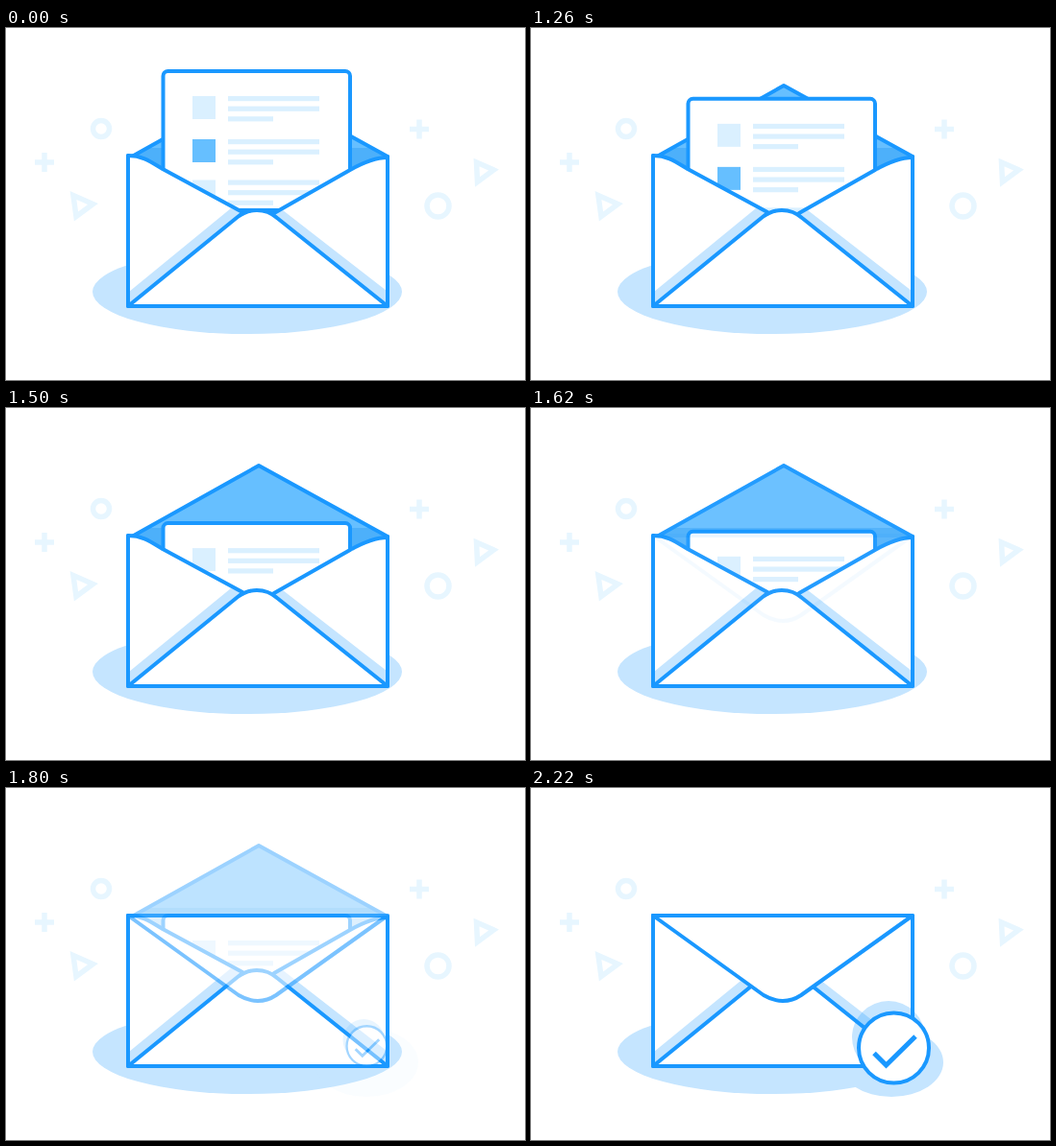
An HTML page for the animation above (3060 ms loop, 540 px wide and 367 px high).

```html
<!DOCTYPE html>
<html lang="en">
<head>
<meta charset="utf-8">
<title>Envelope</title>
<style>
  html, body { margin: 0; width: 100%; height: 100%; overflow: hidden; background: #fff; }
  svg { display: block; width: 100%; height: 100%; }
  .line { stroke: #1a98ff; stroke-width: 4; stroke-linejoin: round; stroke-linecap: round; }
  .shade { fill: #c5e5ff; }
  .deco { fill: none; stroke: #e7f6ff; stroke-width: 5.5; }
</style>
</head>
<body>
<svg viewBox="0 0 540 367" fill="none">
  <g class="deco">
    <path d="M30 140H50M40 130V150M420 105.500H440M430 95.500V115.500"/>
    <circle cx="99" cy="105" r="8.500"/>
    <circle cx="449.500" cy="185.500" r="11.500"/>
    <path d="M70 174.500L90.500 183.500L73 196.500ZM489.500 140L507.500 148L490.500 160.500Z"/>
  </g>

  <ellipse class="shade" cx="251" cy="275" rx="161" ry="44"/>
  <ellipse id="badgeShade" class="shade" cx="375" cy="286" rx="54" ry="36"/>
  <path d="M127 133H397V290H127Z" fill="#fff"/>

  <g id="back">
    <path d="M131 134L263 60L397 134L370 165H150Z" fill="#66bfff"/>
    <path d="M131 134L149 125H377L397 134L370 165H150Z" fill="#4db0fa"/>
    <path class="line" d="M131 134L263 60L397 134"/>
  </g>

  <g id="paper">
    <rect class="line" x="163.500" y="0" width="194.500" height="145" rx="5" fill="#fff"/>
  </g>

  <path d="M127 133C142 133 150 139 163 147L246 192L262 196L279 194L358 149C372 141 384 134 397 134V290H127Z" fill="#fff"/>
  <path class="shade" d="M128 290V275L234 188L246 192ZM396 290V274L288 190L279 194Z"/>
  <path class="line" d="M127 133C142 133 150 139 163 147L246 192M397 135C384 135 372 140 358 148L279 193"/>
  <path class="line" d="M127 290L241 197Q250 190 261 190Q273 190 282 198L397 290Z" fill="#fff"/>
  <path class="line" d="M127 133V290H397V134"/>

  <g id="flap">
    <path class="line" d="M127 133L242 216Q252 222 262 222Q272 222 281 216L397 133Z" fill="#fff"/>
    <path class="line" d="M127 133H397"/>
  </g>

  <g id="badge">
    <circle cx="372" cy="260" r="38" fill="#1a98ff" fill-opacity=".25"/>
    <circle class="line" cx="377.500" cy="271" r="36.500" fill="#fff"/>
    <path d="M357 276.500L369.500 289L400 259" stroke="#1a98ff" stroke-width="5"/>
  </g>
</svg>
<script>
const LOOP = 3060, STEP = 60;
const $ = id => document.getElementById(id);
const ramp = (t, start, length) => Math.min(1, Math.max(0, (t - start) / length));

function addBox(x, y, w, h, fill) {
  const box = document.createElementNS('http://www.w3.org/2000/svg', 'rect');
  for (const [k, v] of Object.entries({ x, y, width: w, height: h, fill })) box.setAttribute(k, v);
  $('paper').append(box);
}

[26, 71, 113.5].forEach((y, row) => {
  addBox(194, y, 24, 24, row === 1 ? '#66bfff' : '#daf0ff');
  [95, 95, 47].forEach((w, i) => addBox(231, y + i * 10.6, w, 5.2, '#daf0ff'));
});

// Cubic bezier (.25, .1, .25, 1), solved by bisection
function ease(x) {
  const bez = (a, b, u) => 3 * a * u * (1 - u) ** 2 + 3 * b * u * u * (1 - u) + u ** 3;
  let lo = 0, hi = 1;
  for (let i = 0; i < 24; i++) {
    const mid = (lo + hi) / 2;
    if (bez(.25, .25, mid) < x) lo = mid; else hi = mid;
  }
  return bez(.1, 1, lo);
}

const backOut = x => 1 + 2.70158 * (x - 1) ** 3 + 1.70158 * (x - 1) ** 2;

function draw(t) {
  const closed = ramp(t, 1605, 340);
  const size = Math.max(0, backOut(ramp(t, 1747, 353)));
  $('paper').setAttribute('transform', `translate(0 ${45 + 88 * ease(ramp(t, 1110, 700))})`);
  $('back').setAttribute('opacity', 1 - closed);
  for (const part of $('flap').children) part.setAttribute('opacity', closed);
  $('badge').setAttribute('transform', `translate(372.5 266.5) scale(${size}) translate(-372.5 -266.5)`);
  $('badge').setAttribute('opacity', ramp(t, 1747, 133));
  $('badgeShade').setAttribute('opacity', ramp(t, 1770, 330));
}

const origin = performance.now();
function tick(now) {
  const t = Math.max(0, now - origin) % LOOP;
  draw(Math.floor(t / STEP) * STEP);
  requestAnimationFrame(tick);
}
draw(0);
requestAnimationFrame(tick);
</script>
</body>
</html>
```
